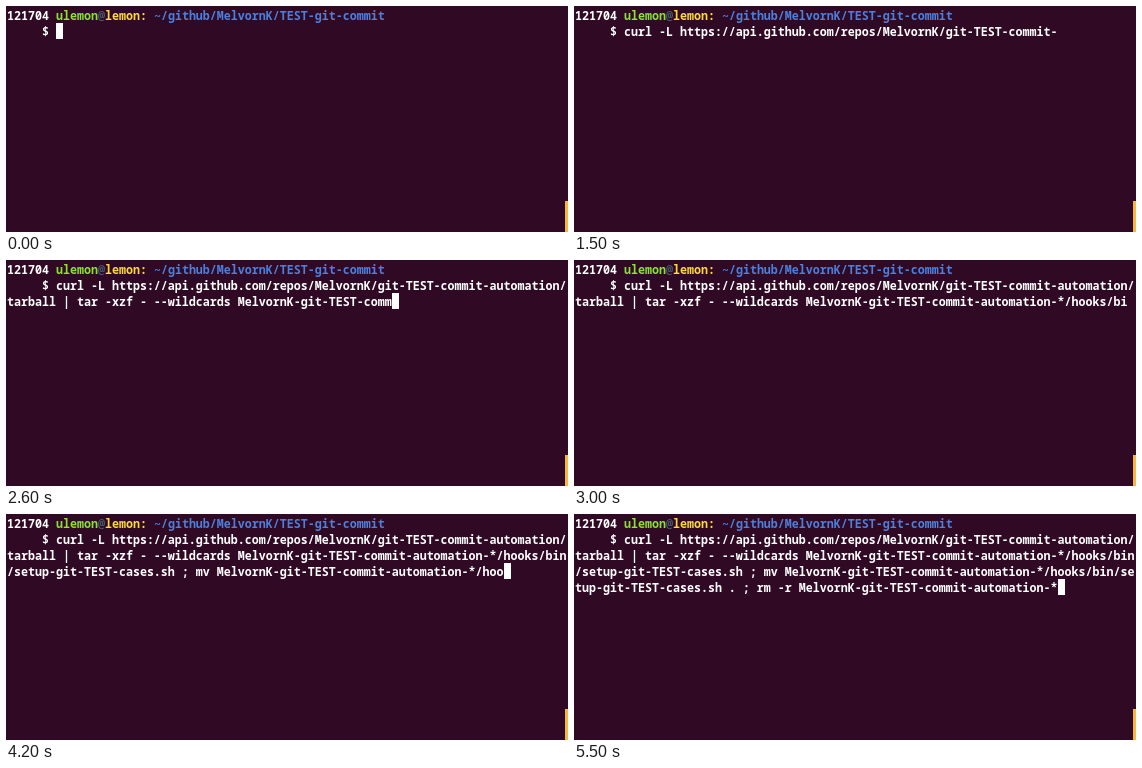
Recreate the animation shown at these times as an HTML page. Size 562 px wide and 226 px high, loop 8000 ms.

```html
<!DOCTYPE html>
<html lang="en">
<head>
<meta charset="utf-8">
<title>Terminal</title>
<style>
  html, body { margin: 0; width: 100%; height: 100%; overflow: hidden; background: #300a24; }
  svg { display: block; }
  text {
    font-family: "Noto Sans Mono", "DejaVu Sans Mono", monospace;
    font-weight: 600;
    white-space: pre;
    fill: #fff;
  }
</style>
</head>
<body>
<svg id="stage" width="562" height="226" viewBox="0 0 562 226">
  <rect width="562" height="226" fill="#300a24"/>
  <rect x="559" y="195" width="3" height="31" fill="#f8b63c"/>
  <text x="1" y="14">121704 <tspan fill="#8ae234">ulemon</tspan><tspan fill="#46586a">@</tspan><tspan fill="#fcd93c">lemon:</tspan> <tspan fill="#4d7fdc">~/github/MelvornK/TEST-git-commit</tspan></text>
  <rect id="cursor" width="7" height="16" fill="#fff"/>
</svg>
<script>
const LOOP = 8000, START = 500, STEP = 100;
const COLS = 80, CELL = 7, ROW = 16;
const stage = document.getElementById('stage');
const cursor = document.getElementById('cursor');

const prompt = '     $ ';
const folder = 'MelvornK-git-TEST-commit-automation-*';
const script = 'setup-git-TEST-cases.sh';
const typed = prompt +
  'curl -L https://api.github.com/repos/MelvornK/git-TEST-commit-automation/tarball' +
  ` | tar -xzf - --wildcards ${folder}/hooks/bin/${script}` +
  ` ; mv ${folder}/hooks/bin/${script} . ; rm -r ${folder}`;

// Choose the size at which one character fills one cell.
const ctx = document.createElement('canvas').getContext('2d');
ctx.font = '600 100px ' + getComputedStyle(stage.querySelector('text')).fontFamily;
stage.style.fontSize = 100 * CELL / ctx.measureText('0').width + 'px';

const rows = Array.from({ length: Math.ceil(typed.length / COLS) }, (_, i) => {
  const row = document.createElementNS(stage.namespaceURI, 'text');
  row.setAttribute('x', 1);
  row.setAttribute('y', 14 + ROW * (i + 1));
  return stage.appendChild(row);
});

function draw(now) {
  const step = Math.floor((now % LOOP - START) / STEP);
  const count = step < 0 ? prompt.length
    : Math.min(typed.length, prompt.length + 2 + 6 * step);
  const shown = typed.slice(0, count);
  rows.forEach((row, i) => {
    const line = shown.slice(i * COLS, (i + 1) * COLS);
    if (row.textContent !== line) row.textContent = line;
  });

  // The cursor blinks while typing and stays lit before and after.
  const busy = step >= 0 && count < typed.length;
  const lit = !busy || (step + 10) % 17 >= 8;
  cursor.setAttribute('x', 1 + CELL * (count % COLS));
  cursor.setAttribute('y', 1 + ROW * (1 + Math.floor(count / COLS)));
  cursor.setAttribute('visibility', lit ? 'visible' : 'hidden');
}

function tick() {
  draw(performance.now());
  requestAnimationFrame(tick);
}
tick();
</script>
</body>
</html>
```
